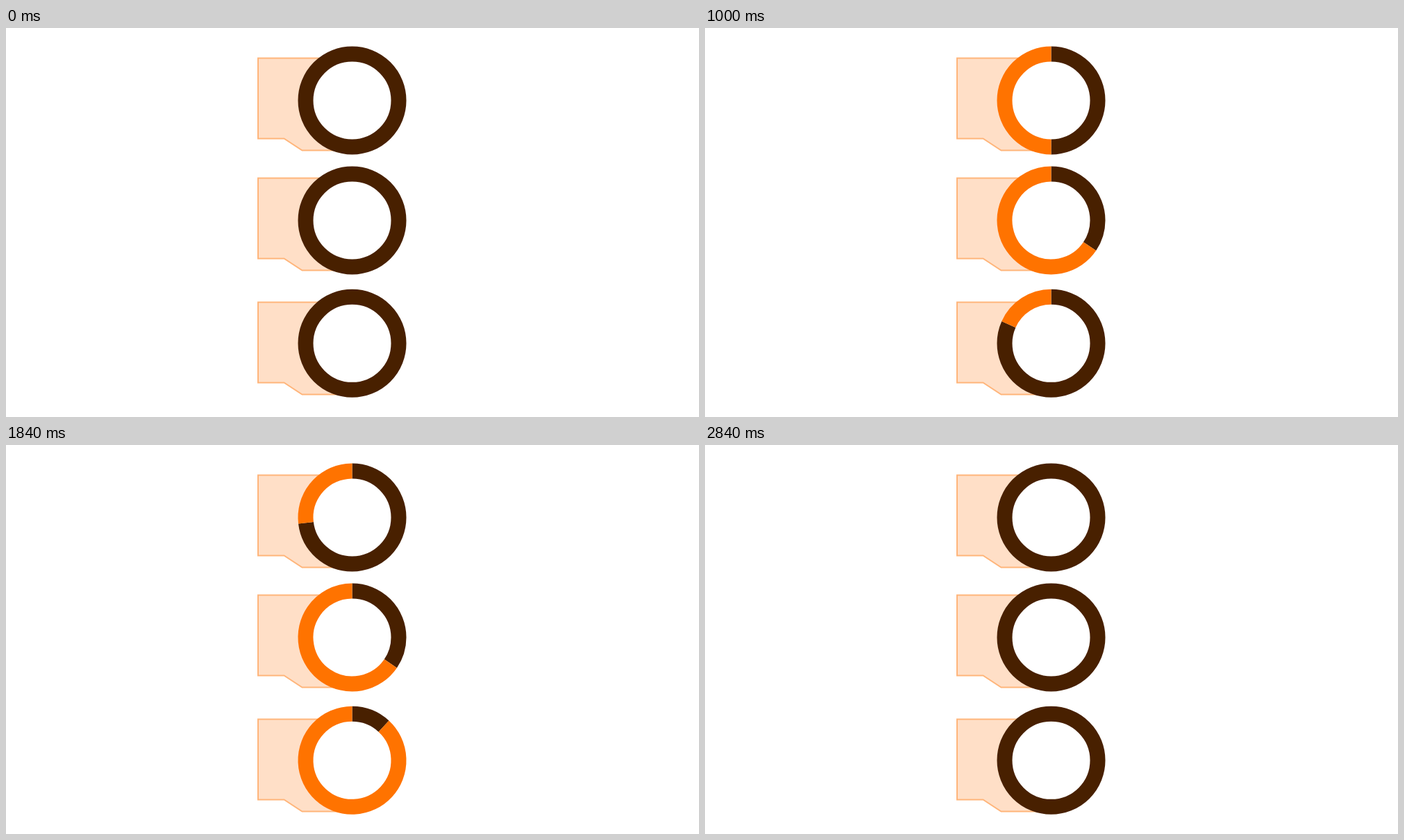
Recreate the animation shown at these times as an HTML page with a canvas. Size 998x561 px, loop 3520 ms.

```html
<!DOCTYPE html>
<html lang="en">
<head>
<meta charset="utf-8">
<title>Three ring gauges</title>
<style>
  html, body { margin: 0; width: 100%; height: 100%; overflow: hidden; background: #fff; }
  canvas { display: block; }
</style>
</head>
<body>
<canvas id="stage" width="998" height="561"></canvas>
<script>
const ctx = document.getElementById('stage').getContext('2d');
const LOOP = 3520, STEP = 40;
const CENTER_X = 498.5, RADIUS = 67, THICKNESS = 22;
const TOP = -Math.PI / 2, TURN = Math.PI * 2;

// Times in ms; each ease holds the x values of its two Bezier handles.
const RISE_EASE = [1, 0.33];
const rings = [
  { y: 104.5, panelY: 43.5, peak: 0.5, riseEnd: 850, fall: [1200, 2380], fallEase: [0.8, 0.34] },
  { y: 277.5, panelY: 216.5, peak: 0.691, riseEnd: 1262, fall: [1335, 2840], fallEase: [1, 0.48] },
  { y: 454.8, panelY: 395.5, peak: 0.882, riseEnd: 1905, fall: [1905, 2840], fallEase: [0.85, 0.2] }
];

function ease(x, [x1, x2]) {
  if (x <= 0) return 0;
  if (x >= 1) return 1;
  let low = 0, high = 1;
  for (let i = 0; i < 30; i++) {
    const s = (low + high) / 2, r = 1 - s;
    if (3 * x1 * s * r * r + 3 * x2 * s * s * r + s * s * s < x) low = s;
    else high = s;
  }
  return low * low * (3 - 2 * low);
}

function share(ring, t) {
  const [start, end] = ring.fall;
  const up = ease(t / ring.riseEnd, RISE_EASE);
  const down = ease((t - start) / (end - start), ring.fallEase);
  return ring.peak * up * (1 - down);
}

function drawPanel(y) {
  ctx.beginPath();
  ctx.moveTo(CENTER_X, y);
  ctx.lineTo(363, y);
  ctx.lineTo(363, y + 116);
  ctx.lineTo(400.5, y + 116);
  ctx.lineTo(426.5, y + 133);
  ctx.lineTo(CENTER_X, y + 133);
  ctx.fillStyle = '#ffdfc7';
  ctx.fill();
  ctx.strokeStyle = '#ffb57a';
  ctx.lineWidth = 2;
  ctx.stroke();
}

function drawArc(y, from, to, color) {
  ctx.beginPath();
  ctx.arc(CENTER_X, y, RADIUS, TOP + from * TURN, TOP + to * TURN);
  ctx.strokeStyle = color;
  ctx.lineWidth = THICKNESS;
  ctx.stroke();
}

function draw(now) {
  const t = Math.floor((now % LOOP) / STEP) * STEP;
  ctx.fillStyle = '#fff';
  ctx.fillRect(0, 0, 998, 561);
  for (const ring of rings) {
    drawPanel(ring.panelY);
    ctx.beginPath();
    ctx.arc(CENTER_X, ring.y, RADIUS, 0, TURN);
    ctx.fillStyle = '#fff';
    ctx.fill();
    const orange = t < 80 ? 0 : share(ring, t);
    drawArc(ring.y, 0, 1 - orange, '#482000');
    if (orange > 0) drawArc(ring.y, 1 - orange, 1, '#ff7300');
  }
}

const began = performance.now();
function tick() {
  draw(performance.now() - began);
  requestAnimationFrame(tick);
}
tick();
</script>
</body>
</html>
```
